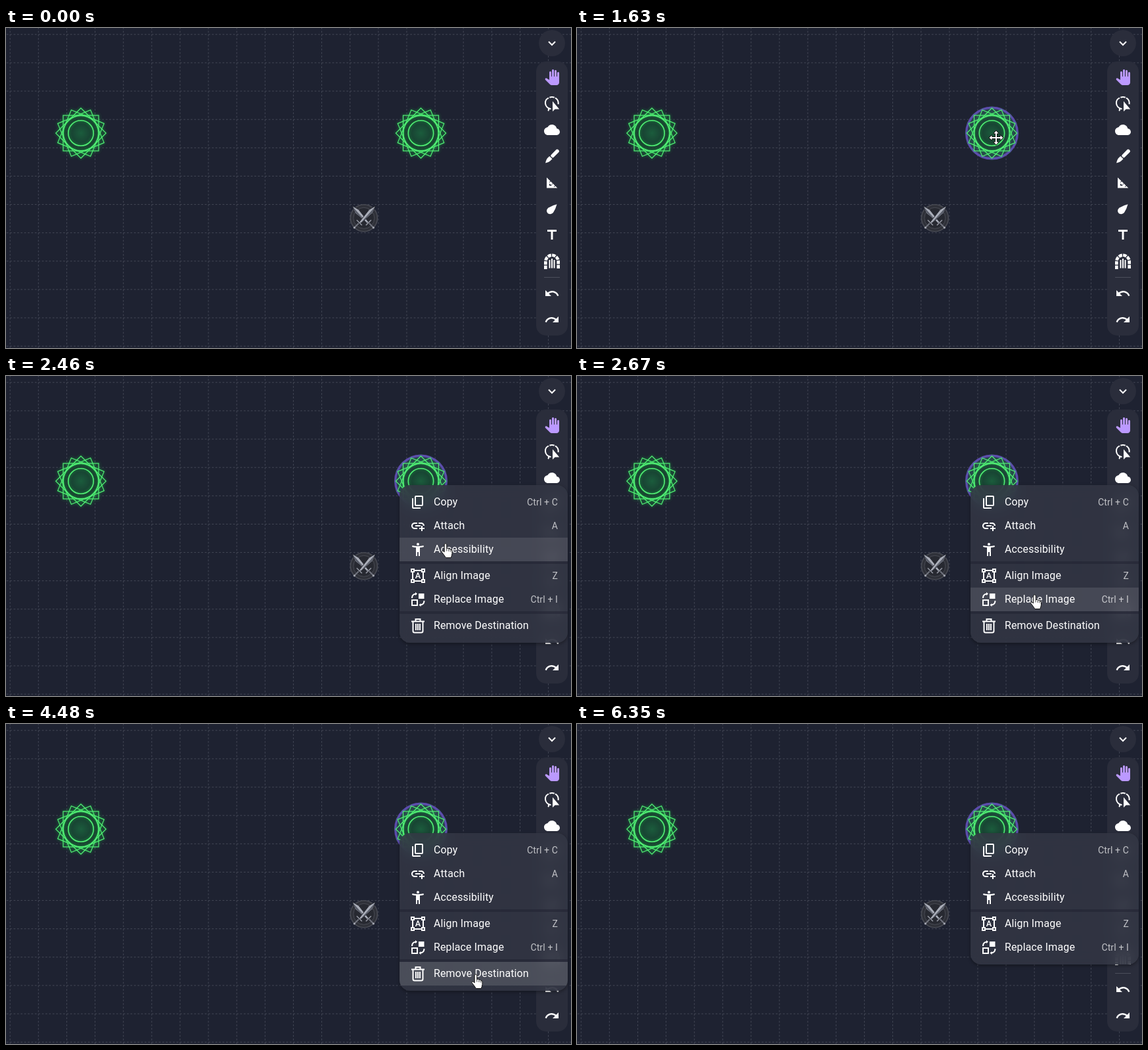
These frames come from a looping animation (860x487 px, 7080 ms). An HTML page:

```html
<!DOCTYPE html>
<html lang="en">
<head>
<meta charset="utf-8">
<title>Map context menu</title>
<style>
html, body { margin: 0; width: 100%; height: 100%; overflow: hidden; background: #1e2231; }
#stage { position: relative; width: 860px; height: 487px; overflow: hidden; font-family: Roboto, sans-serif; }
#board, #pointer { position: absolute; left: 0; top: 0; width: 860px; height: 487px; }
#menu {
  position: absolute; left: 599px; top: 166px; width: 256px; padding: 8px 0; box-sizing: border-box;
  border-radius: 16px; background: rgba(51, 54, 68, .87); backdrop-filter: blur(10px);
  box-shadow: 0 2px 5px rgba(0, 0, 0, .35); overflow: hidden; transform-origin: 32px 0;
}
.row { position: relative; height: 36px; color: #fff; font-size: 16px; line-height: 35px; letter-spacing: .13px; }
.row.hover { background: rgba(255, 255, 255, .1); }
.row.press { background: rgba(255, 255, 255, .13); }
.row svg { position: absolute; left: 16px; top: 6px; width: 24px; height: 24px; overflow: visible; fill: #fff; }
.row span { position: absolute; left: 52px; white-space: nowrap; }
.row kbd { position: absolute; right: 15px; top: .5px; font: inherit; font-size: 14px; color: rgba(255, 255, 255, .7); }
.gap { height: 4px; background: rgba(34, 36, 50, .6); }
.line { fill: none; stroke: #fff; stroke-width: 2; }
.glow { filter: drop-shadow(0 0 2px rgba(24, 216, 74, .8)); }
</style>
</head>
<body>
<div id="stage">
<svg id="board" viewBox="0 0 860 487">
  <defs>
    <radialGradient id="core">
      <stop offset="0" stop-color="#1b5c3c"/><stop offset="1" stop-color="#183c31"/>
    </radialGradient>
    <g id="portal">
      <circle r="27" fill="#19342e" opacity=".75"/>
      <circle r="19" fill="url(#core)"/>
      <g class="glow" fill="none" stroke="#52f075" stroke-width="1.2">
        <g id="squares"></g>
        <circle r="26.8" stroke-width="1.5"/>
        <circle r="19.2" stroke-width="1.6"/>
      </g>
    </g>
    <g id="sword">
      <path d="M17.5-18.5 13.5-8-5 8-7 6 8-13z" fill="#a9adb8" stroke="#23252e"/>
      <path d="M16-16 13-8.5-5 7.5z" fill="#565a66"/>
      <path d="M-11 3-3 11" stroke="#9396a1" stroke-width="1.6"/>
      <path d="M-8 8-14 14" stroke="#70737e" stroke-width="2"/>
      <circle cx="-14.5" cy="14.5" r="1.6" fill="#a4a7b1"/>
    </g>
  </defs>
  <path id="grid" fill="none" stroke="#444856" stroke-dasharray="2.695"/>
  <use href="#portal" x="114" y="160"/>
  <circle id="ring" cx="631.5" cy="160" r="38.8" fill="rgba(84,62,160,.25)" stroke="#5f48b0" stroke-width="3.4"/>
  <use href="#portal" x="631.5" y="160"/>
  <g transform="translate(544.8 289.3)">
    <circle r="20.5" fill="#2f3139" stroke="#484a53" stroke-width="1.6"/>
    <circle r="16" fill="#272931" stroke="#494b54"/>
    <use href="#sword" transform="scale(-1 1)"/>
    <use href="#sword"/>
  </g>

  <g fill="#2a2d3b">
    <circle cx="831" cy="23" r="20"/>
    <rect x="807" y="51" width="48" height="417" rx="15"/>
  </g>
  <g fill="#fff">
    <path class="line" d="M826 20.8l5 5 5-5"/>
    <path fill="#bb99ff" transform="translate(819 63)" d="M21.5 4c-.83 0-1.5.67-1.5 1.5v5c0 .28-.22.5-.5.5s-.5-.22-.5-.5v-8c0-.83-.67-1.5-1.5-1.5S16 1.67 16 2.5v8c0 .28-.22.5-.5.5s-.5-.22-.5-.5v-9c0-.83-.67-1.5-1.5-1.5S12 .67 12 1.5v9c0 .28-.22.5-.5.5s-.5-.22-.5-.5v-6C11 3.67 10.33 3 9.5 3S8 3.67 8 4.5v11.4l-4.1-2.35c-.58-.33-1.3-.24-1.8.22-.6.58-.62 1.54-.03 2.13l6.8 6.9c.75.77 1.77 1.2 2.85 1.2H19c2.2 0 4-1.8 4-4V5.5C23 4.67 22.33 4 21.5 4z"/>
    <path class="line" d="M829.5 123.2C819 121 818.5 109.5 826 106.3M827.3 105.7Q831 104.3 834.8 105.7M836 106.3Q841.5 109.5 840.6 116M825.5 121.5q1.5 3-.5 4.5"/>
    <path d="M832 111.5v15.5l3.7-3.6h6.5z"/>
    <path transform="translate(819 143)" d="M19.35 10C18.67 6.6 15.64 4 12 4 9.1 4 6.6 5.64 5.35 8 2.34 8.36 0 10.9 0 14c0 3.3 2.7 6 6 6h13c2.76 0 5-2.24 5-5 0-2.64-2.05-4.78-4.65-5z"/>
    <g transform="translate(831 195.5) rotate(45)">
      <rect x="-2.7" y="-14" width="5.4" height="15" rx="2"/>
      <path d="M-3 2.3h6v4q0 3-3 7.7-3-4.7-3-7.7z"/>
    </g>
    <path fill-rule="evenodd" d="M823 227.5l16.3 16H823zM827 236.5v3.5h4z"/>
    <path d="M829 233l-2 2M832.5 236.5l-2 2M836 240l-2 2" stroke="#2a2d3b"/>
    <path d="M838.5 268.3q-2 7.5-5.3 12.2c-2.5 3.3-6.5 3.5-8.7 1.3s-2-5.7 1.3-8.2q5-3.5 12.7-5.3z"/>
    <path transform="translate(819 303)" d="M5 4v3h5.5v12h3V7H19V4z"/>
    <path fill="none" stroke="#fff" stroke-width="4.6" stroke-dasharray="5.4 1.3" d="M821.3 367V355.5A9.7 9.7 0 0 1 840.7 355.5V367"/>
    <path class="line" d="M827.5 353v12.5M831 351v14.5M834.5 353v12.5"/>
    <path d="M819 379.5h24" stroke="#4b4e5b"/>
    <path id="undo" transform="translate(819 392)" d="M12.5 8c-2.65 0-5 1-6.9 2.6L2 7v9h9l-3.6-3.6c1.4-1.2 3.2-1.9 5.1-1.9 3.54 0 6.55 2.3 7.6 5.5l2.37-.8C21 11 17.15 8 12.5 8z"/>
    <use href="#undo" transform="translate(1662 40) scale(-1 1)"/>
  </g>
</svg>

<div id="menu"></div>

<svg id="pointer" viewBox="0 0 860 487">
  <g id="arrow" fill="#fff" stroke="#111" stroke-linejoin="round">
    <path d="M-.3-.3v16.5l3.8-3.6 3.2 7 2.8-1.2-3.1-6.9h5z"/>
  </g>
  <g id="hand" fill="#fff" stroke="#111" stroke-linejoin="round">
    <path d="M-1.8 1.5Q0-1 1.8 1.5V8Q4 7 5 8.7 7 8 7.7 9.7 10 9.5 10 12v4q-.5 3-1.7 6H.5Q-2 18-6 13q.5-3 4.2.3z"/>
    <path d="M1.8 8v4M5 9v3.5M7.8 10v3" stroke-width=".8"/>
  </g>
  <g id="move" stroke-linejoin="round">
    <path d="M0-10.5 3.6-6.5H1V-1H6.5V-3.6L10.5 0 6.5 3.6V1H1V6.5H3.6L0 10.5-3.6 6.5H-1V1H-6.5V3.6L-10.5 0-6.5-3.6V-1H-1V-6.5H-3.6z" fill="#fff" stroke="#111" stroke-width="1.8" paint-order="stroke"/>
  </g>
</svg>
</div>

<script>
const LOOP = 7080, STEP = 70, CELL = 43.125, LEFT = 6.2, TOP = 9.8;
const $ = id => document.getElementById(id);

let grid = '';
for (let x = LEFT; x < 860; x += CELL) grid += `M${x} ${TOP - CELL}V487`;
for (let y = TOP; y < 487; y += CELL) grid += `M${LEFT - CELL} ${y}H860`;
$('grid').setAttribute('d', grid);

$('squares').innerHTML = [0, 22.5, 45, 67.5].map(a =>
  `<rect x="-27" y="-27" width="54" height="54" transform="rotate(${a})"/>`).join('');

const icons = {
  copy: '<path class="line" d="M9 3h9q1 0 1 1v12q0 1-1 1H9q-1 0-1-1V4q0-1 1-1zM4 6v14q0 1 1 1h11"/>',
  attach: '<path d="M8 11h8v2H8zm12.1 1H22c0-2.76-2.24-5-5-5h-4v1.9h4c1.7 0 3.1 1.4 3.1 3.1zM3.9 12c0-1.7 1.4-3.1 3.1-3.1h4V7H7c-2.76 0-5 2.24-5 5s2.24 5 5 5h4v-1.9H7c-1.7 0-3.1-1.4-3.1-3.1zM19 12h-2v3h-3v2h3v3h2v-3h3v-2h-3z"/>',
  person: '<circle cx="12" cy="4" r="2"/><path d="M20.5 6Q16.5 7 12 7T3.500 6L3 8q3 .8 6 1v13h2v-6h2v6h2V9q3-.2 6-1z"/>',
  align: '<path class="line" d="M7 4h10M7 20h10M4 7v10M20 7v10M2 2h4v4H2zM18 2h4v4h-4zM2 18h4v4H2zM18 18h4v4h-4z"/><path fill-rule="evenodd" d="M13.7 14h-3.5l-.7 2H7.9l3.4-9h1.4l3.4 9h-1.6zm-3-1.3h2.6L12 8.9z"/>',
  swap: '<path class="line" d="M3 13h8v8H3z"/><path class="line" stroke-width="1.5" d="M3 10q0-6 6-6.500M21.500 14q0 6-6 6.500"/><path d="M13 3h8.500v8H13zM8 1l3 2.500L8 6zM16.500 18l-3 2.500 3 2.500z"/>',
  trash: '<path class="line" d="M2 5.5h20M8.5 5V2h7v3M4.5 6v14q0 2.5 2.5 2.5h10q2.5 0 2.5-2.5V6M9 9v10M12 9v10M15 9v10"/>'
};
const items = [
  ['copy', 'Copy', 'Ctrl + C'], ['attach', 'Attach', 'A'], ['person', 'Accessibility', ''], null,
  ['align', 'Align Image', 'Z'], ['swap', 'Replace Image', 'Ctrl + I'], null,
  ['trash', 'Remove Destination', '']
];
const menu = $('menu');
menu.innerHTML = items.map(item => item
  ? `<div class="row"><svg viewBox="0 0 24 24">${icons[item[0]]}</svg><span>${item[1]}</span><kbd>${item[2]}</kbd></div>`
  : '<div class="gap"></div>').join('');
const rows = [...menu.querySelectorAll('.row')];
const rowTops = [174, 210, 246, 286, 322, 362];
const removable = [menu.lastElementChild, menu.lastElementChild.previousElementSibling];

// Menu grows open: the scale settles before the fade does.
const OPEN = 1640, SHRINK = 4550;
const grow = (frames, duration) => {
  const anim = menu.animate(frames, { delay: OPEN, duration, fill: 'both', easing: 'cubic-bezier(.4,0,.2,1)' });
  anim.pause();
  return anim;
};
const opening = [
  grow({ opacity: [0, 1] }, 294),
  grow({ transform: ['scale(.75,.5625)', 'none'] }, 196)
];

// Pointer paths: time, x, y
const paths = [
  [[260, 606, 454], [400, 617, 400], [540, 636, 300], [680, 655, 205], [750, 656, 182],
   [890, 642.5, 172], [960, 642, 179], [1100, 638, 167]],
  [[OPEN, 637, 165.5], [2240, 637, 165.5], [2310, 642, 182], [2450, 669, 254.5], [2590, 689, 312],
   [2730, 704, 353], [2870, 712, 374], [2940, 714.5, 379], [3080, 715, 380.5]],
  [[6070, 715, 380.5], [6140, 705, 395], [6280, 677, 440]]
];

function pointAt(t) {
  if (t < 260 || t >= 6350) return null;
  const path = paths[t < OPEN ? 0 : t < 6140 ? 1 : 2];
  const anchor = t < OPEN ? 260 : t < 6140 ? 2310 : 6140;
  const q = anchor + Math.floor((t - anchor) / STEP) * STEP;
  let i = 1;
  while (i < path.length - 1 && path[i][0] < q) i++;
  const [t0, x0, y0] = path[i - 1], [t1, x1, y1] = path[i];
  const k = Math.min(1, Math.max(0, (q - t0) / (t1 - t0)));
  return [x0 + (x1 - x0) * k, y0 + (y1 - y0) * k];
}

function draw(t) {
  const p = pointAt(t);
  const shrunk = t >= SHRINK;
  $('ring').style.display = t >= 1500 ? '' : 'none';
  opening.forEach(a => a.currentTime = t);
  removable.forEach(el => el.style.display = shrunk ? 'none' : '');

  const hover = p && t >= 2310 && !shrunk
    ? rowTops.findIndex(y => p[1] >= y && p[1] < y + 36) : -1;
  rows.forEach((row, i) => {
    row.classList.toggle('hover', i === hover);
    row.classList.toggle('press', i === hover && t >= 4480);
  });

  const onToken = p && t < OPEN && Math.hypot(p[0] - 631.5, p[1] - 160) < 40;
  const kind = !p ? '' : hover >= 0 ? 'hand' : onToken ? 'move' : 'arrow';
  for (const id of ['arrow', 'hand', 'move']) {
    $(id).style.display = id === kind ? '' : 'none';
    if (id === kind) $(id).setAttribute('transform', `translate(${p[0]} ${p[1]})`);
  }
}

const start = performance.now();
function tick() {
  draw((performance.now() - start) % LOOP);
  requestAnimationFrame(tick);
}
tick();
</script>
</body>
</html>
```
